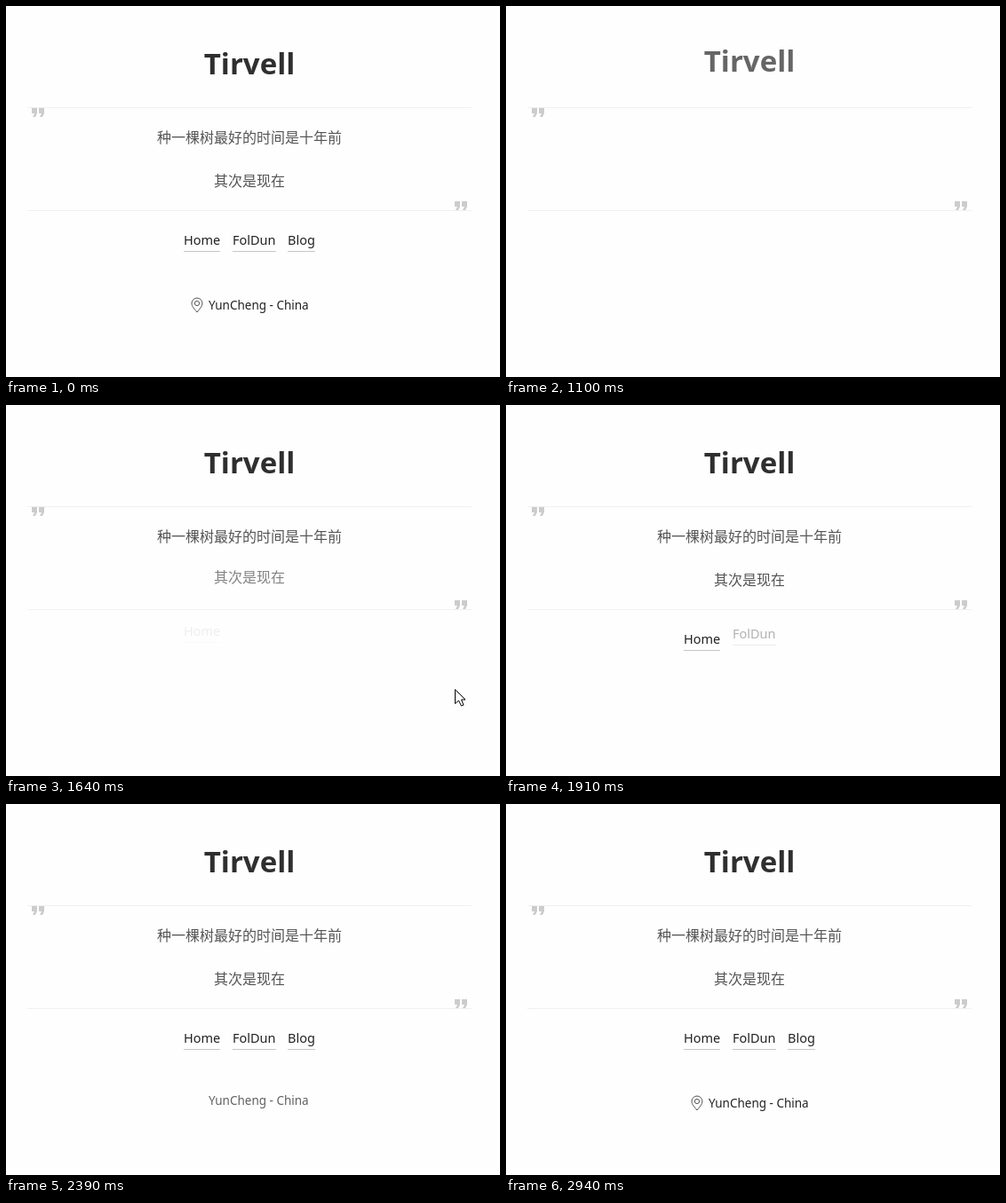
An HTML page with a canvas that plays this animation: 556 px wide and 418 px high, repeating every 3340 ms.

```html
<!DOCTYPE html>
<html lang="zh-CN">
<head>
<meta charset="utf-8">
<title>Tirvell</title>
<style>
  html, body { margin: 0; width: 100%; height: 100%; overflow: hidden; background: #fefefe; }
  canvas { display: block; }
</style>
</head>
<body>
<canvas id="stage" width="556" height="418"></canvas>
<script>
const ctx = document.getElementById('stage').getContext('2d');
const LOOP = 3340;
const INTRO = 860;
const SHIFT = 10;
const LATIN = '"Noto Sans", "Open Sans", sans-serif';
const CJK = '"Noto Sans CJK SC", "Noto Sans CJK", sans-serif';

// The picture holds still between these moments.
const STEPS = [860, 980, 1100, 1220, 1370, 1490, 1640, 1760, 1910,
  2030, 2150, 2270, 2390, 2540, 2700, 2820, 2940];

function text(str, x, y, font, color, align = 'left') {
  ctx.font = font;
  ctx.fillStyle = color;
  ctx.textAlign = align;
  ctx.fillText(str, x, y);
}

function poly(points, x, y) {
  ctx.beginPath();
  points.forEach(([px, py]) => ctx.lineTo(x + px, y + py));
  ctx.closePath();
}

const verse = (str, y) => () => text(str, 274, y, `16px ${CJK}`, '#555', 'center');

const link = (str, x) => () => {
  text(str, x, 269, `14.5px ${LATIN}`, '#222');
  ctx.fillStyle = '#c8c4ca';
  ctx.fillRect(x, 276, Math.round(ctx.measureText(str).width), 1);
};

function pin() {
  ctx.strokeStyle = '#555';
  ctx.lineWidth = 1;
  ctx.beginPath();
  ctx.moveTo(215, 345);
  ctx.bezierCurveTo(212, 341, 209, 338.5, 209, 335);
  ctx.arc(215, 335, 6, Math.PI, 0);
  ctx.bezierCurveTo(221, 338.5, 218, 341, 215, 345);
  ctx.closePath();
  ctx.stroke();
  ctx.beginPath();
  ctx.arc(215, 335, 2.6, 0, Math.PI * 2);
  ctx.stroke();
}

const items = [
  { start: 835, dur: 360, draw: () => text('Tirvell', 274, 77, `bold 33px ${LATIN}`, '#2f2f2f', 'center') },
  { start: 1258, draw: verse('种一棵树最好的时间是十年前', 154) },
  { start: 1437, draw: verse('其次是现在', 203) },
  { start: 1620, draw: link('Home', 200) },
  { start: 1812, draw: link('FolDun', 255) },
  { start: 2000, draw: link('Blog', 317) },
  { start: 2190, draw: () => text('YunCheng - China', 228, 342, `13.5px ${LATIN}`, '#222') },
  { start: 2630, from: SHIFT, draw: pin }
];

const QUOTE = [[1, 10], [4, 10], [6, 6], [6, 0], [0, 0], [0, 6], [3, 6]];

function quotes(x, y) {
  ctx.fillStyle = '#ccc';
  for (const dx of [0, 8]) {
    poly(QUOTE, x + dx, y);
    ctx.fill();
  }
}

const ARROW = [[0, 0], [0, 16], [4, 12.5], [7, 18.5], [9.5, 17.5], [7, 11.5], [11.5, 11.5]];

function cursor(x, y) {
  poly(ARROW, x + 0.5, y + 0.5);
  ctx.fillStyle = '#fff';
  ctx.fill();
  ctx.strokeStyle = '#000';
  ctx.lineWidth = 1;
  ctx.stroke();
}

function drawItem({ start, dur = 280, from = -SHIFT, draw }, t) {
  const p = t < INTRO ? 1 : Math.min(1, Math.max(0, (t - start) / dur));
  if (p === 0) return;
  ctx.save();
  ctx.globalAlpha = p;
  ctx.translate(0, Math.round(from * (1 - p)));
  draw();
  ctx.restore();
}

function render(now) {
  const time = now % LOOP;
  const t = STEPS.reduce((last, s) => (s <= time ? s : last), 0);

  ctx.fillStyle = '#fefefe';
  ctx.fillRect(0, 0, 556, 418);
  ctx.fillStyle = '#f0f0f0';
  ctx.fillRect(24, 114, 500, 1);
  ctx.fillRect(24, 230, 500, 1);
  quotes(29, 115);
  quotes(505, 220);

  items.forEach(item => drawItem(item, t));
  if (t === 1640) cursor(505, 320);
  if (t === 1760) cursor(484, 337);
}

const origin = performance.now();
function tick() {
  render(performance.now() - origin);
  requestAnimationFrame(tick);
}
tick();
</script>
</body>
</html>
```
